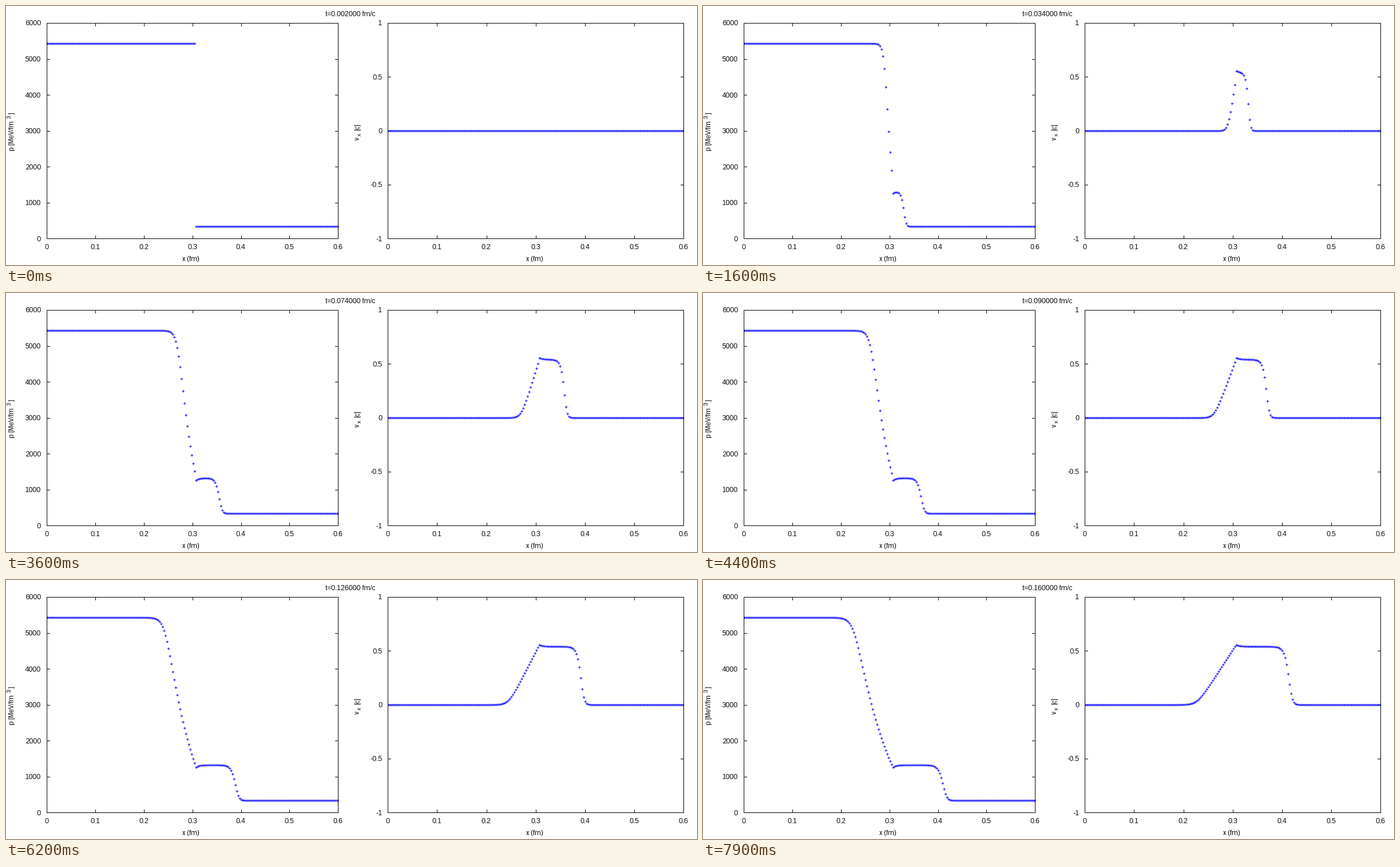
These frames come from a looping animation (1222 by 458 pixels, 8000 ms). A matplotlib script:

```python
import numpy as np
import matplotlib.pyplot as plt
from matplotlib.animation import FuncAnimation
from matplotlib.collections import LineCollection

WIDTH, HEIGHT, DPI = 1222, 458, 100
PX = 72 / DPI                      # one pixel in points
FRAMES, INTERVAL = 80, 100
TOP, BOTTOM = 30, 411.25
ARM = 2.25                         # half the size of a plotted cross

CELLS, DX, WALL = 200, 0.003, 102  # the membrane sits left of cell WALL
P_LEFT, P_RIGHT, V_PLATEAU = 5430.0, 337.0, 0.5407
SOUND = 1 / np.sqrt(3)

cell = np.arange(CELLS)
x = DX * (cell + 0.5)


def softplus(u):
    return np.logaddexp(0, u)


def rarefaction(k, step):
    """Velocity k cells left of the wall: a linear fan with a rounded head."""
    head = step / 3 + 0.4
    rounding = 0.285 * np.sqrt(step)
    fan = rounding * softplus((head - k) / rounding)
    return fan / (SOUND * (step + 3.3))


def shock(j, step):
    """Fraction of the plateau velocity j cells right of the wall."""
    middle = 0.434 * step + min(1, step / 9)
    u = (j - middle) / (step / 16) ** 0.31
    return 1 / (1 + np.exp(0.85 * u + 0.7 * softplus(u) - 0.4))


def fluid(step):
    """Pressure and velocity in every cell after the given number of steps."""
    p = np.where(cell < WALL, P_LEFT, P_RIGHT)
    v = np.zeros(CELLS)
    if step == 0:
        return p, v

    v[:WALL] = rarefaction(WALL - cell[:WALL], step)
    p[:WALL] *= np.exp(-4 * SOUND * np.arctanh(v[:WALL]))

    j = cell[WALL:] - WALL
    part = shock(j, step)
    flow = V_PLATEAU * part
    p[WALL:] *= np.exp(2.262 * np.arctanh(flow)) * (1 - 0.05 * part * np.exp(-j / 2))
    v[WALL:] = flow + 0.0145 * part * np.exp(-j / 2.5)
    return p, v


class Panel:
    def __init__(self, left, right, low, high, yticks, label_x):
        self.left, self.right, self.low, self.high = left, right, low, high
        self.draw_frame(yticks)
        label(label_x, 451, "x (fm)", ha="center")
        self.points = ax.add_collection(LineCollection(
            [], colors="#0000ff", linewidths=PX, snap=False, zorder=3))

    def col(self, value):
        return self.left + value / 0.6 * (self.right - self.left)

    def row(self, value):
        share = (value - self.low) / (self.high - self.low)
        return BOTTOM - share * (BOTTOM - TOP)

    def draw_frame(self, yticks):
        l, r, t, b = self.left, self.right, TOP, BOTTOM
        lines = [[(l, t), (r, t)], [(l, b), (r, b)],
                 [(l, t), (l, b)], [(r, t), (r, b)]]
        for i in range(7):
            c = self.col(i / 10)
            lines += [[(c, b), (c, b - 5)], [(c, t), (c, t + 5)]]
            label(c, 430, f"{i / 10:g}", ha="center")
        for value in yticks:
            y = self.row(value)
            lines += [[(l, y), (l + 5, y)], [(r, y), (r - 5, y)]]
            label(l - 10, y + 4.5, f"{value:g}", ha="right")
        ax.add_collection(LineCollection(
            lines, colors="black", linewidths=PX, capstyle="projecting",
            snap=True, zorder=2))

    def show(self, values):
        # half a pixel leads from a pixel's corner to its centre
        centre = np.column_stack([self.col(x), self.row(values)]) + 0.5
        arms = [np.stack([centre - arm, centre + arm], axis=1)
                for arm in ((ARM, 0), (0, ARM))]
        self.points.set_segments(np.concatenate(arms))


def label(px, py, text, size=12, **style):
    return ax.text(px, py, text, fontsize=size * PX, va="baseline", **style)


def upright(px, py, text, size=12):
    label(px, py, text, size, ha="left", rotation=90, rotation_mode="anchor")


plt.rcParams.update({"font.family": "Liberation Sans",
                     "text.hinting": "native", "text.hinting_factor": 1})
fig = plt.figure(figsize=(WIDTH / DPI, HEIGHT / DPI), dpi=DPI, facecolor="white")
ax = fig.add_axes([0, 0, 1, 1])
ax.set_xlim(0, WIDTH)
ax.set_ylim(HEIGHT, 0)
ax.axis("off")

pressure = Panel(72, 587.25, 0, 6000, range(0, 6001, 1000), 327.5)
velocity = Panel(675.25, 1198, -1, 1, (-1, -0.5, 0, 0.5, 1), 935)

upright(14, 255.5, "p [MeV/fm")
upright(9, 199, "3", 9.6)
upright(14, 191, "]")
upright(625, 237, "v")
upright(628, 229.5, "x", 9.6)
upright(625, 219.5, "[c]")
title = label(609, 18, "", ha="center")


def update(frame):
    p, v = fluid(frame)
    pressure.show(p)
    velocity.show(v)
    title.set_text(f"t={0.002 * (frame + 1):.6f} fm/c")
    return pressure.points, velocity.points, title


anim = FuncAnimation(fig, update, frames=FRAMES, interval=INTERVAL,
                     repeat=True, repeat_delay=0)
plt.show()
```
